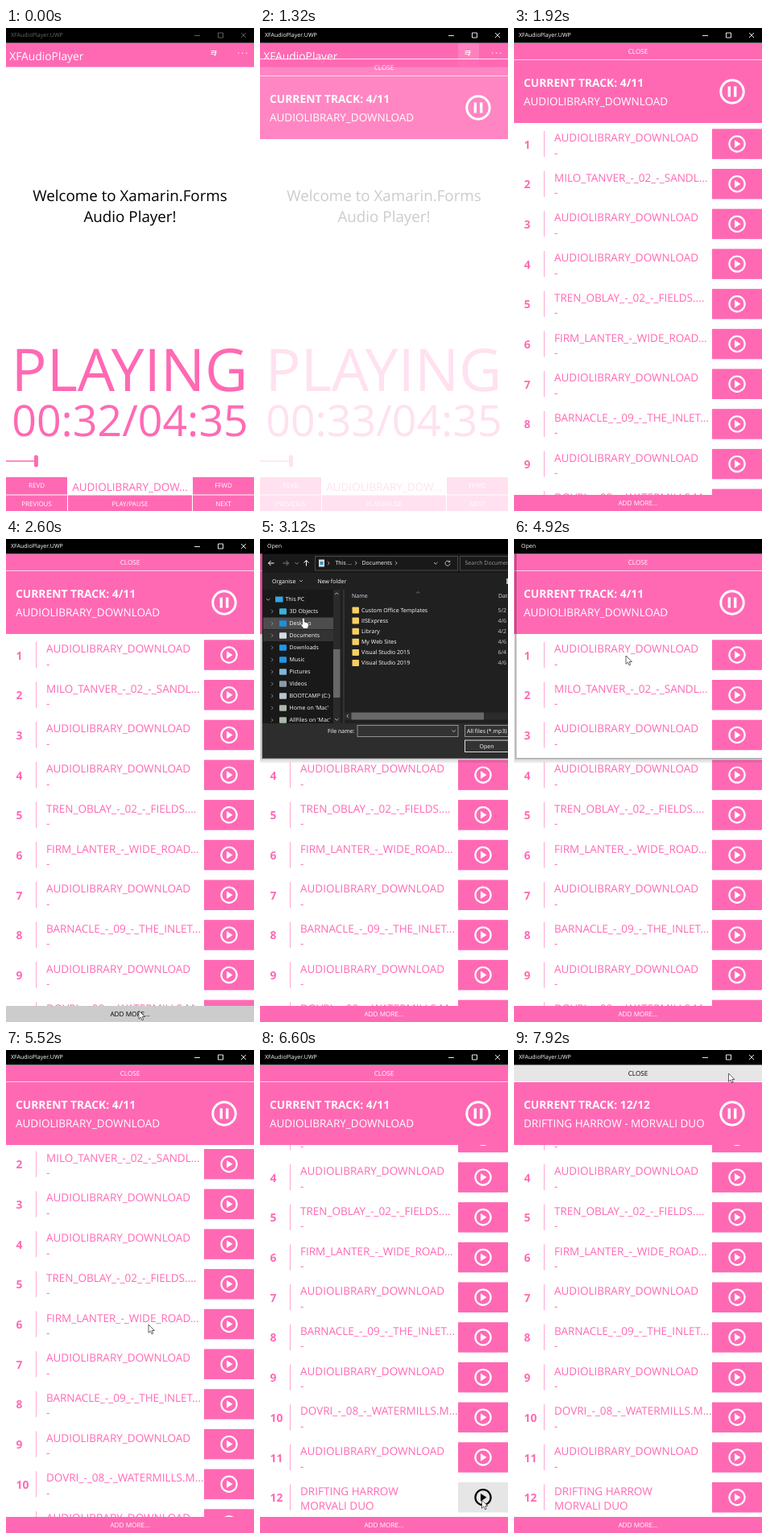
An HTML page for the animation above (8 s loop, 308 by 600 pixels).

```html
<!DOCTYPE html>
<html lang="en">
<head>
<meta charset="utf-8">
<title>Audio player</title>
<style>
html, body { margin: 0; width: 100%; height: 100%; overflow: hidden; background: #fff; }
svg { display: block; width: 308px; height: 600px; font-family: "Open Sans", "Noto Sans", sans-serif; text-rendering: geometricPrecision; }
</style>
</head>
<body>
<svg id="stage" viewBox="0 0 308 600"></svg>
<script>
const LOOP = 8000, PINK = '#ff69b4', HOVER = '#e6e6e6', PRESSED = '#ccc';
const PITCH = 49.7;
const stage = document.getElementById('stage');

const GENERIC = ['AUDIOLIBRARY_DOWNLOAD', '-'];
const TRACKS = [
  GENERIC,
  ['MILO_TANVER_-_02_-_SANDL...', '-'],
  GENERIC,
  GENERIC,
  ['TREN_OBLAY_-_02_-_FIELDS....', '-'],
  ['FIRM_LANTER_-_WIDE_ROAD...', '-'],
  GENERIC,
  ['BARNACLE_-_09_-_THE_INLET...', '-'],
  GENERIC,
  ['DOVRI_-_08_-_WATERMILLS.M...', '-'],
  GENERIC,
  ['DRIFTING HARROW', 'MORVALI DUO'],
];

const PLACES = [
  ['3D Objects', '#3bb2d8'], ['Desktop', '#1e8fe0'], ['Documents', '#d5dde2'],
  ['Downloads', '#2196e8'], ['Music', '#2196e8'], ['Pictures', '#7db7d6'],
  ['Videos', '#8b9aa5'], ['BOOTCAMP (C:)', '#b9c2c8'], ["Home on 'Mac'", '#a9b8a9'], ["AllFiles on 'Mac'", '#a9b8a9'],
];
const DOCUMENTS = [
  ['Custom Office Templates', '5/2'], ['IISExpress', '4/6'], ['Library', '4/2'],
  ['My Web Sites', '4/6'], ['Visual Studio 2015', '6/4'], ['Visual Studio 2019', '4/6'],
];
const DESKTOP = [
  ['Projects', '4/6'], ['Recordings', '5/2'], ['Screenshots', '4/2'],
  ['Templates', '4/6'], ['Drifting Harrow.mp3', '6/4'],
];

// Keyframes: [time, ...values], linear in between
const POINTER = [
  [320, 300, 190], [920, 258, 32], [1920, 250, 280], [2400, 165, 586], [2720, 165, 586],
  [3120, 52, 98], [3920, 52, 98], [4600, 139, 145], [5120, 139, 145], [5520, 177, 341],
  [5920, 205, 420], [6400, 274, 560], [6520, 274, 560], [6600, 275.5, 559],
  [7520, 275.5, 559], [7920, 266.5, 29],
];
const SCROLL = [[5200, 0], [5520, 52], [5920, 135]];
const PAGE_RISE = [[1040, 100], [1320, 20], [1520, 0]];
const ROWS_RISE = [[1720, 50], [1800, 18], [1920, 0]];

function at(keys, t) {
  const next = keys.findIndex(k => k[0] > t);
  if (next === 0) return keys[0].slice(1);
  if (next < 0) return keys[keys.length - 1].slice(1);
  const a = keys[next - 1], b = keys[next], p = (t - a[0]) / (b[0] - a[0]);
  return a.slice(1).map((v, i) => v + (b[i + 1] - v) * p);
}
const within = (t, from, to) => t >= from && t < to;

const rect = (x, y, w, h, fill, more = '') =>
  `<rect x="${x}" y="${y}" width="${w}" height="${h}" fill="${fill}" ${more}/>`;
const line = (d, color, width = 1, more = '') =>
  `<path d="${d}" fill="none" stroke="${color}" stroke-width="${width}" ${more}/>`;
const text = (x, y, str, size, fill, more = '') =>
  `<text x="${x}" y="${y}" font-size="${size}" fill="${fill}" ${more}>${str}</text>`;
const centred = (x, y, str, size, fill) => text(x, y, str, size, fill, 'text-anchor="middle"');
const bold = (x, y, str, size, fill) => text(x, y, str, size, fill, 'font-weight="700"');
const group = (content, y, more = '') => `<g transform="translate(0 ${y})" ${more}>${content}</g>`;
const ring = (x, y, r, color, width) =>
  `<circle cx="${x}" cy="${y}" r="${r}" fill="none" stroke="${color}" stroke-width="${width}"/>`;

function bar(y, h, label, state) {
  const fill = state || PINK;
  return rect(0, y, 308, h, fill) + centred(154, y + 13, label, 8.2, state ? '#000' : '#fff');
}

function titleBar(t) {
  if (within(t, 2800, 5120)) return rect(0, 0, 308, 18.5, '#000') + text(9, 10.7, 'Open', 7, '#fff');
  const color = t < 920 ? '#6a6a6a' : '#fff';
  return rect(0, 0, 308, 18.5, '#000') + text(6, 11, 'XFAudioPlayer.UWP', 7.05, color) +
    line('M234 9.5h7M263.5 6h6v6h-6zM292 6l6 6m0-6l-6 6', color, 0.9);
}

function player(t) {
  const second = t < 600 ? 32 : 33, knob = 37.4 + (second - 32) * 1.1;
  const button = (x, y, w, label) => rect(x, y, w, y < 570 ? 21.5 : 20, PINK) +
    centred(x + w / 2, y + 13.3, label, 8, '#fff');
  return rect(0, 18.5, 308, 30, PINK) +
    (t >= 800 ? rect(246, 18.5, 26, 30, '#fff', 'opacity=".15"') : '') +
    text(4.3, 39.7, 'XFAudioPlayer', 13.8, '#fff') +
    line('M254.5 28.5h7M254.5 30.5h7M254.5 32.5h3M260.3 29v4', '#fff', 0.9) +
    `<circle cx="259.3" cy="33.4" r="1.1" fill="#fff"/>` +
    [288.7, 293.7, 298.7].map(x => rect(x - 0.6, 30.6, 1.2, 1.2, '#fff')).join('') +
    centred(154, 214.6, 'Welcome to Xamarin.Forms', 18.8, '#000') +
    centred(154, 241.2, 'Audio Player!', 18.8, '#000') +
    centred(153.5, 451, 'PLAYING', 73.2, PINK) +
    centred(154, 507.2, `00:${second}/04:35`, 53.6, PINK) +
    line(`M0 538H${knob}`, PINK, 1.4) +
    rect(knob - 2.5, 530.5, 5, 15, PINK, 'rx="2.5"') +
    button(0, 558, 76, 'REVD') + centred(154, 574.5, 'AUDIOLIBRARY_DOW...', 13.5, PINK) +
    button(232, 558, 76, 'FFWD') + button(0, 580.5, 76, 'PREVIOUS') +
    button(77, 580.5, 154, 'PLAY/PAUSE') + button(232, 580.5, 76, 'NEXT');
}

function trackRow([title, artist], index, t) {
  const hovered = index === 11 && within(t, 6320, 7600);
  const fill = !hovered ? PINK : within(t, 6800, 6920) ? PRESSED : HOVER;
  const icon = hovered ? '#000' : '#fff';
  return group(
    bold(12.5, 5.5, index + 1, 13.8, PINK) +
    line('M37.5 -16V16', PINK, 1, 'opacity=".6"') +
    text(50, -3, title, 13.5, PINK) + text(50, 15.5, artist, 13.5, PINK) +
    rect(246, -18.7, 62, 37.5, fill) + ring(277, 0, 9.6, icon, 2.2) +
    `<path d="M274 -4.8L281.5 0L274 4.8Z" fill="${icon}"/>`,
    144 + index * PITCH);
}

function playlist(t) {
  const tracks = t < 5200 ? TRACKS.slice(0, 11) : TRACKS;
  const switched = t >= 7120;
  const rows = t < 1720 ? '' : group(tracks.map((track, i) => trackRow(track, i, t)).join(''),
    at(ROWS_RISE, t)[0] - at(SCROLL, t)[0]);
  const addState = within(t, 2400, 2600) ? HOVER : within(t, 2600, 2800) ? PRESSED : '';
  return rect(0, 18, 308, 582, '#fff') +
    `<g clip-path="url(#list)">${rows}</g>` +
    bar(19, 20.3, 'CLOSE', t >= 7920 ? HOVER : '') +
    rect(0, 40, 308, 78, PINK) +
    bold(12, 73.3, `CURRENT TRACK: ${switched ? '12/12' : '4/11'}`, 13.8, '#fff') +
    text(12, 96, switched ? TRACKS[11].join(' - ') : GENERIC[0], 13.5, '#fff') +
    ring(271, 79, 14.2, '#fff', 3) + rect(265.6, 72.5, 3.4, 13, '#fff') + rect(273, 72.5, 3.4, 13, '#fff') +
    bar(580, 20, 'ADD MORE...', addState);
}

function dialogShadow() {
  return [0, 1, 2, 3, 4, 5].map(i =>
    line(`M${2.5 - i} 18V${272.5 + i}H308`, '#000', 1, `opacity="${0.36 / (1 + i * 0.8)}"`)).join('');
}

function placesTree(t) {
  const desktop = t >= 3520;
  const row = (i, fill) => rect(4, 97.5 + (i - 1) * 15, 87, 14.5, fill);
  const items = PLACES.map(([name, color], i) => {
    const y = 90 + i * 15;
    return line(`M14 ${y - 2.2}l2.2 2.2l-2.2 2.2`, '#999', 0.8) +
      rect(24, y - 3.8, 9, 7.5, color, 'rx="1"') + text(36.5, y + 2.3, name, 7, '#fff');
  }).join('');
  return `<g clip-path="url(#tree)">` + rect(3, 63, 101, 166, '#191919') +
    row(1, desktop ? '#777' : within(t, 3120, 3520) ? '#4d4d4d' : '#191919') +
    (desktop ? '' : row(2, '#333')) +
    line('M8 74l2.2 2.2L12.4 74', '#ccc', 0.8) + rect(19, 71.5, 9.5, 7, '#35a5e5') +
    text(31.5, 77.3, 'This PC', 7, '#fff') + items + `</g>` +
    rect(91, 63, 8.5, 166, '#2b2b2b') + rect(91, 137, 8.5, 60, '#686868') +
    line('M93 69l2.2-2.2L97.4 69M93 223l2.2 2.2l2.2-2.2', '#ccc', 0.8) +
    rect(103.5, 63, 1, 166, '#444');
}

function fileList(t) {
  const desktop = t >= 4000, files = desktop ? DESKTOP : DOCUMENTS;
  const thumbEnd = t < 3800 ? 278 : 299;
  return text(114, 73, 'Name', 7, '#ddd') + text(296, 73, 'Date', 7, '#ddd') +
    line('M194 67.5l2-2l2 2', '#aaa', 0.7) +
    files.map(([name, date], i) => {
      const y = 88.5 + i * 13.1, song = name.endsWith('.mp3');
      const picked = song && t >= 4600;
      return (picked ? rect(108, y - 6.5, 200, 13, '#777') : '') +
        rect(114.5, y - 4, song ? 7 : 8.5, 8, song ? '#d5dde2' : '#f5cf63', 'rx=".8"') +
        text(126, y + 2.4, name, 7.05, '#fff') + text(295.5, y + 2.4, date, 7, '#ccc');
    }).join('') +
    rect(104.5, 215.5, 204, 9, '#2b2b2b') + rect(113.5, 215.5, thumbEnd - 113.5, 9, '#686868') +
    line('M110 217.8l-2.2 2.2l2.2 2.2', '#ccc', 0.8);
}

function dialog(t) {
  const folder = t >= 4000 ? 'Desktop' : 'Documents';
  return rect(3, 18, 305, 254, '#202020') + rect(3, 18, 305, 24, '#191919') +
    line('M17.5 30h-7m3-3l-3 3l3 3M57.5 33.5v-7m-3 3l3-3l3 3', '#fff', 1) +
    line('M28.5 30h7m-3-3l3 3l-3 3M43.5 29l2.2 2.2l2.2-2.2', '#888', 1) +
    rect(68.5, 21.5, 177, 17.5, '#191919', 'stroke="#555" stroke-width=".8"') +
    rect(73, 25.5, 7, 9, '#d5dde2') + rect(74.5, 28, 4, 4, '#3b93c8') +
    line('M84 27.8l2.2 2.2l-2.2 2.2M118 27.8l2.2 2.2l-2.2 2.2M168 27.8l2.2 2.2l-2.2 2.2', '#ccc', 0.8) +
    text(93.5, 32.3, 'This ...', 7, '#fff') + text(126.5, 32.3, folder, 7, '#fff') +
    line('M216 29l2.2 2.2l2.2-2.2M235.5 28.5a3 3 0 1 0 .5 2.2m-.3-4v2h-2', '#ccc', 0.9) +
    rect(248.5, 21.5, 70, 17.5, '#191919', 'stroke="#555" stroke-width=".8"') +
    text(254.5, 32.3, `Search ${folder}`, 7, '#999') +
    text(15, 54.8, 'Organise', 7, '#fff') + line('M49 51l2 2l2-2', '#ccc', 0.8) +
    text(71.5, 54.8, 'New folder', 7, '#fff') +
    rect(306, 49, 2, 7, '#9fc3d8') +
    placesTree(t) + fileList(t) +
    rect(3, 229, 305, 43.5, '#2d2d2d') +
    text(117.5, 241, 'File name:', 7, '#fff', 'text-anchor="end"') +
    rect(121, 231.5, 125, 14, '#333', 'stroke="#aaa" stroke-width=".8"') +
    line('M238.5 237.5l2.2 2.2l2.2-2.2', '#ddd', 0.8) +
    (t >= 4600 ? text(124.5, 241, DESKTOP[4][0], 7, '#fff') : '') +
    rect(254.5, 231.5, 60, 14, '#333', 'stroke="#aaa" stroke-width=".8"') +
    text(257, 241, 'All files (*.mp3)', 7, '#fff') +
    rect(254.5, 250, 60, 14.5, '#333', 'stroke="#ddd" stroke-width="1"') +
    text(272.5, 259.8, 'Open', 7, '#fff');
}

function pointer(t) {
  if (!within(t, 320, 1120) && t < 2000) return '';
  const [x, y] = at(POINTER, t);
  const hand = within(t, 3120, 3600);
  const d = hand
    ? 'M2 0q1.4 0 1.4 1.5V5l5 1.5V10L7 13.5H2L-1.5 8.5q0-1.6 1.9-.3V1.5Q.6 0 2 0z'
    : 'M0 0V10.3L2.4 8.1L4 11.8L5.7 11L4.2 7.5H7.4Z';
  return `<path transform="translate(${x} ${y})" d="${d}" fill="#fff" stroke="#222" stroke-width=".7"/>`;
}

function picture(t) {
  let body = t < 1520 ? player(t) : '';
  if (t >= 1120) {
    const rise = at(PAGE_RISE, t)[0];
    body += group(playlist(t), rise, `opacity="${1 - rise / 100}"`);
  }
  if (within(t, 2800, 5120)) body += dialogShadow();
  if (within(t, 2800, 4920)) body += dialog(t);
  return `<clipPath id="list"><rect y="118" width="308" height="462"/></clipPath>
    <clipPath id="tree"><rect x="3" y="63" width="88" height="166"/></clipPath>` +
    rect(0, 0, 308, 600, '#fff') + body + titleBar(t) + pointer(t);
}

const start = performance.now();
let shown = -1;
function tick() {
  const now = (performance.now() - start) % LOOP;
  const t = Math.floor(now / 200) * 200 + (now % 200 >= 120 ? 120 : 0);
  if (t !== shown) {
    shown = t;
    stage.innerHTML = picture(t);
  }
  requestAnimationFrame(tick);
}
tick();
</script>
</body>
</html>
```
